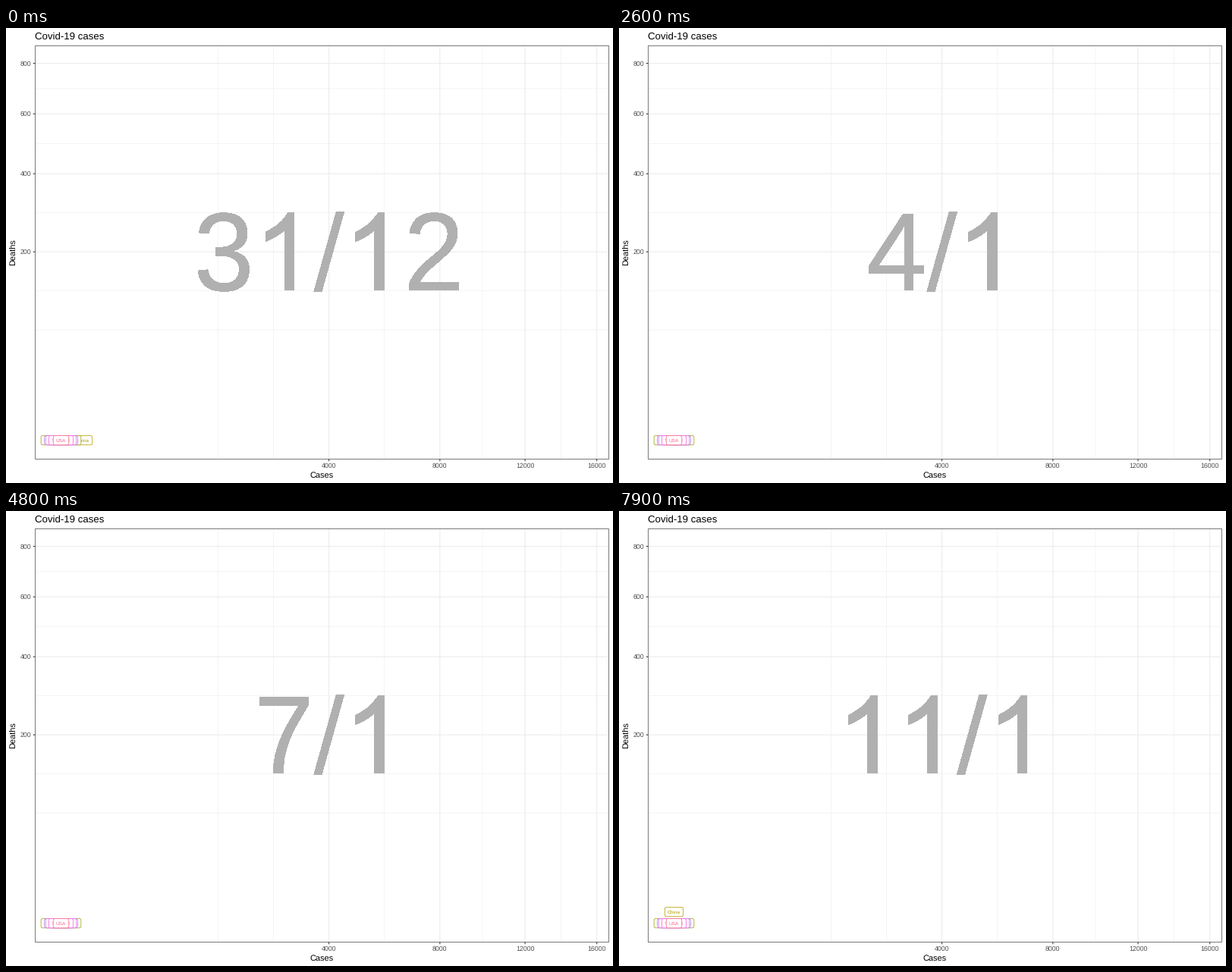
Write a matplotlib script that moves like this. It is 800 px wide and 600 px high and loops after 8000 ms.

```python
import numpy as np
import matplotlib.pyplot as plt
from matplotlib.animation import FuncAnimation
from matplotlib.patches import FancyBboxPatch, PathPatch, Rectangle
from matplotlib.path import Path
from matplotlib.textpath import TextPath

FONT = "Liberation Sans"
plt.rcParams["font.family"] = FONT
plt.rcParams["text.hinting"] = "none"

PT = 0.72                    # points per pixel at 100 dpi
FRAMES, INTERVAL = 80, 100
FRAMES_PER_DAY = 7.28
LEFT, RIGHT, TOP, BOTTOM = 38.5, 794.5, 23.5, 568.5

fig = plt.figure(figsize=(8, 6), dpi=100, facecolor="white")
ax = fig.add_axes([0, 0, 1, 1])
ax.set_xlim(0, 800)
ax.set_ylim(600, 0)
ax.axis("off")


def x_pos(root):
    return 72.5 + 5.583 * root


def y_pos(root):
    return 543.7 - 17.575 * root


def line(xs, ys, width, color, z):
    ax.plot(xs, ys, color=color, lw=width * PT, zorder=z,
            solid_capstyle="butt", snap=False)


def text(x, y, s, size, color="black", **kw):
    return ax.text(x, y, s, fontsize=size * PT, color=color, **kw)


# ---- panel, grid and axes (both scales are square roots) ----
def minor_breaks(major):
    """Midpoints of the breaks, continued below the first one."""
    step = major[1] - major[0]
    ticks = np.concatenate([[major[0] - step], major])
    return np.append((ticks[1:] + ticks[:-1]) / 2, ticks[0])


cases = np.array([4000, 8000, 12000, 16000])
deaths = np.array([200, 400, 600, 800])
x_major, y_major = x_pos(np.sqrt(cases)), y_pos(np.sqrt(deaths))

for breaks, width, z in ((minor_breaks, 0.53, 1), (np.asarray, 1.07, 2)):
    for x in breaks(x_major):
        line([x, x], [TOP, BOTTOM], width, "#ebebeb", z)
    for y in breaks(y_major):
        line([LEFT, RIGHT], [y, y], width, "#ebebeb", z)

for x, n in zip(x_major, cases):
    line([x, x], [BOTTOM, BOTTOM + 2.75], 1.07, "#333333", 2)
    text(x, 580, n, 8.8, "#4d4d4d", ha="center")
for y, n in zip(y_major, deaths):
    line([LEFT - 2.75, LEFT], [y, y], 1.07, "#333333", 2)
    text(33.3, y + 3.2, n, 8.8, "#4d4d4d", ha="right")

ax.add_patch(Rectangle((LEFT, TOP), RIGHT - LEFT, BOTTOM - TOP, fill=False,
                       ec="#333333", lw=0.65 * PT, snap=False, zorder=30))
text(38, 15, "Covid-19 cases", 13.2)
text(416, 593, "Cases", 11, ha="center")
text(13.3, 296, "Deaths", 11, rotation=90, rotation_mode="anchor",
     ha="center", va="baseline")


# ---- large date ----
EM = 142.26
UNIT = EM / 2048
BASELINE = 346

ONE = Path(
    [(763, 0), (583, 0), (583, 1147),
     (518, 1085), (412.5, 1023), (307, 961), (223, 930),
     (223, 1104), (374, 1175), (487, 1276), (600, 1377), (647, 1472),
     (763, 1472), (763, 0)],
    [1, 2, 2, 3, 3, 3, 3, 2, 3, 3, 3, 3, 2, 79])
SLASH = Path([(0, -25), (427, 1497), (572, 1497), (146, -25), (0, -25)],
             [1, 2, 2, 2, 79])


def glyph(char):
    """Outline of one character in pixels, with y up, and its advance."""
    if char == "/":
        return SLASH.vertices * UNIT, SLASH.codes, 569 * UNIT
    if char == "1":
        return ONE.vertices * UNIT, ONE.codes, 1139 * UNIT
    path = TextPath((0, 0), char, size=EM, prop={"family": FONT})
    return path.vertices * (1, 1.03), path.codes, 1139 * UNIT


def date_path(s):
    glyphs = [glyph(c) for c in s]
    x = x_pos(np.sqrt(4000)) - sum(g[2] for g in glyphs) / 2
    points, codes = [], []
    for vertices, glyph_codes, advance in glyphs:
        points.append(vertices * (1, -1) + (x, BASELINE))
        codes.append(glyph_codes)
        x += advance
    return Path(np.concatenate(points), np.concatenate(codes))


DATES = [date_path(s) for s in ["31/12"] + [f"{d}/1" for d in range(1, 12)]]
date = ax.add_patch(PathPatch(DATES[0], fc="#b0b0b0", lw=0,
                              antialiased=False, snap=False, zorder=5))


# ---- country labels ----
class Label:
    SIZE, HEIGHT = 6.5, 12.2

    def __init__(self, name, color, z):
        ink = TextPath((0, 0), name, size=self.SIZE, prop={"family": FONT})
        self.width = ink.get_extents().width + 7.7
        self.box = ax.add_patch(FancyBboxPatch(
            (0, 0), self.width, self.HEIGHT, fc="white", ec=color,
            lw=0.75 * PT, zorder=z,
            boxstyle="round,pad=0,rounding_size=2.16"))
        self.text = text(0, 0, name, self.SIZE, color, ha="center",
                         zorder=z + 0.5)
        self.move(0, 0)

    def move(self, root_cases, root_deaths):
        x, y = x_pos(root_cases), y_pos(root_deaths)
        self.box.set_x(x - self.width / 2)
        self.box.set_y(y - self.HEIGHT / 2)
        self.text.set_position((x, y + 2.3))


COUNTRIES = {
    "China": "#b19e00", "Czech Republic": "#9ca400",
    "South Korea": "#b97cf5", "Switzerland": "#d86bf3",
    "Thailand": "#f562db", "USA": "#fb6a8c",
}
labels = {name: Label(name, color, 10 + i)
          for i, (name, color) in enumerate(COUNTRIES.items())}

DAYS = np.arange(12)
KEYS = np.round(DAYS * FRAMES_PER_DAY)
china_cases = np.sqrt([27, 0, 0, 17, 0, 15, 0, 0, 0, 0, 0, 0])
china_deaths = (DAYS == 11).astype(float)


def update(frame):
    date.set_path(DATES[int(frame / FRAMES_PER_DAY + 0.5)])
    labels["China"].move(np.interp(frame, KEYS, china_cases),
                         np.interp(frame, KEYS, china_deaths))
    return []


animation = FuncAnimation(fig, update, frames=FRAMES, interval=INTERVAL,
                          repeat=True, repeat_delay=0, blit=False)
plt.show()
```
